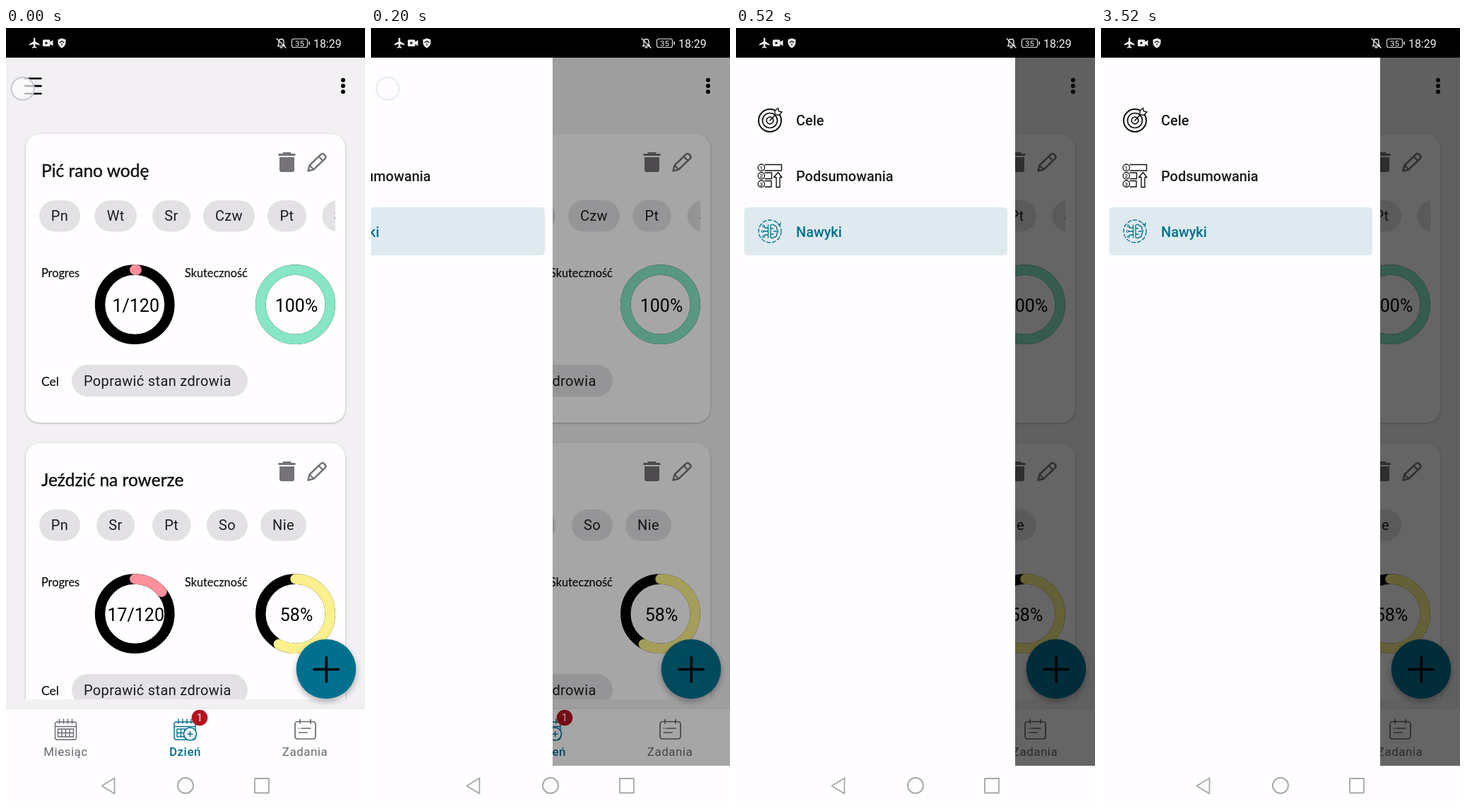
Write an HTML page that moves like this. It is 508 by 1102 pixels and loops after 8000 ms.

```html
<!DOCTYPE html>
<html lang="pl">
<head>
<meta charset="utf-8">
<title>Nawyki</title>
<style>
  html, body { margin: 0; width: 100%; height: 100%; overflow: hidden; background: #fffdff; }
  svg { display: block; width: 508px; height: 1102px; }
  text { font-family: Roboto, "Noto Sans", sans-serif; fill: #1b1b1e; }
  .mid { text-anchor: middle; }
  .title, .label { font-family: Lato, "Open Sans", sans-serif; fill: #111; stroke: #111; stroke-width: .4; }
  .title { font-size: 24.5px; }
  .label { font-size: 16.3px; stroke-width: .2; }
  .chip { font-size: 20px; letter-spacing: .35px; }
  .num { font-size: 25px; fill: #000; }
  .tab { font-size: 17px; letter-spacing: .5px; }
  .item { font-size: 19.9px; font-weight: 500; }
  .card { filter: drop-shadow(0 1px 1.5px rgba(0,0,0,.28)); }
  .fab { filter: drop-shadow(0 4px 4px rgba(0,0,0,.3)); }
  .line { fill: none; stroke-linecap: round; stroke-linejoin: round; }
</style>
</head>
<body>
<svg id="stage" viewBox="0 0 508 1102" xmlns="http://www.w3.org/2000/svg"></svg>
<script>
const LOOP = 8000, STEP = 40, WIDTH = 395;
const TEAL = '#00708e', GRAY = '#69676c';

const text = (x, y, s, cls, extra = '') => `<text x="${x}" y="${y}" class="${cls}" ${extra}>${s}</text>`;
const line = (d, color, w, extra = '') => `<path class="line" d="${d}" stroke="${color}" stroke-width="${w}" ${extra}/>`;
const rect = (x, y, w, h, r, fill, extra = '') => `<rect x="${x}" y="${y}" width="${w}" height="${h}" rx="${r}" fill="${fill}" ${extra}/>`;
const dot = (x, y, r, fill, extra = '') => `<circle cx="${x}" cy="${y}" r="${r}" fill="${fill}" ${extra}/>`;

const chip = ([x, w, s]) => rect(x, 244, w, 44.5, 22.2, '#e3e1e4') + text(x + w / 2, 273, s, 'chip mid');

function ring(x, share, color, label) {
  const c = `cx="${x}" cy="391.7" r="49.2" fill="none" stroke-width="14.4"`;
  return `<circle ${c} stroke="#000"/>
    <circle ${c} stroke="${color}" stroke-linecap="round" pathLength="100"
      stroke-dasharray="${share * 100} ${share < 1 ? 200 : 0}" transform="rotate(-90 ${x} 391.7)"/>` +
    text(x + 1.5, 401.5, label, 'num mid');
}

const trash = rect(385.5, 178, 24, 3, 0, '#757377') + rect(391.5, 176, 12, 3, 1, '#757377') +
  '<path d="M387 183H408V201Q408 204 405 204H390Q387 204 387 201Z" fill="#757377"/>';

const pencil = line('M427.5 202.5L429.5 194.5L445.5 179.2Q447.5 177 450 179L451.6 180.6Q453.6 183 451.4 185.2L435.3 200.5Z', '#757377', 2.5) +
  line('M442.5 182L448.5 188M430 195L435 200', '#757377', 2.2);

function card(dy, name, days, done, doneShare, rate, rateShare, rateColor) {
  return `<g transform="translate(0 ${dy})">` +
    rect(28, 150, 452, 409, 20, '#fffdff', 'class="card"') +
    text(50, 211, name, 'title') + trash + pencil +
    `<g clip-path="url(#row)">${days.map(chip).join('')}</g>` +
    text(50, 353, 'Progres', 'label') + ring(182.2, doneShare, '#ff909b', done) +
    text(253, 353, 'Skuteczność', 'label') + ring(409.5, rateShare, rateColor, rate) +
    text(50, 506.5, 'Cel', 'label', 'style="font-size:17.6px"') +
    rect(93, 477, 249, 45, 22.5, '#e3e1e4') + text(110, 506.5, 'Poprawić stan zdrowia', 'chip') + '</g>';
}

function calendar(x, color) {
  let d = `M${x + 3} 983H${x + 27}Q${x + 30} 983 ${x + 30} 986V1005Q${x + 30} 1008 ${x + 27} 1008H${x + 3}Q${x} 1008 ${x} 1005V986Q${x} 983 ${x + 3} 983M${x} 989.5H${x + 30}`;
  for (const y of [993, 998.5, 1004]) d += `M${x + 4} ${y}H${x + 26}`;
  for (const k of [4, 9.5, 15, 20.5, 26]) d += `M${x + k} 993V1004`;
  for (const k of [6, 12, 18, 24]) d += `M${x + k} 979V985`;
  return line(d, color, 1.4);
}

function tabs() {
  const plus = dot(260.5, 1000, 9, '#fffdff', `stroke="${TEAL}" stroke-width="1.6"`) +
    line('M257 1000H264M260.5 996.5V1003.5', TEAL, 1.5);
  const tasks = line('M413 982.5H434Q438 982.5 438 986.5V1003Q438 1007 434 1007H413Q409 1007 409 1003V986.5Q409 982.5 413 982.5M416 979.5V985M431 979.5V985M418 992H431M414.5 998H426M414.5 992H415', GRAY, 1.7);
  return rect(0, 963, 508, 2, 0, '#e6e4e7') + rect(0, 964.5, 508, 80.5, 0, '#fffdff') +
    calendar(69.5, GRAY) + calendar(238, TEAL) + plus + tasks +
    dot(274, 977, 11.3, '#b3121f') + text(274, 982, '1', 'mid', 'style="font-size:14px;fill:#fff"') +
    text(84.5, 1030.5, 'Miesiąc', 'tab mid', `style="fill:${GRAY}"`) +
    text(253.5, 1030.5, 'Dzień', 'tab mid', `style="fill:${TEAL};font-weight:500"`) +
    text(423, 1030.5, 'Zadania', 'tab mid', `style="fill:${GRAY}"`);
}

function statusBar() {
  const plane = '<path d="M39 14.5Q40.2 13 41.4 14.5V19L47.5 23V24.6L41.4 22.8V26L43.4 27.5V28.7L40.2 27.8L37 28.7V27.5L39 26V22.8L32.8 24.6V23L39 19Z" fill="#eee"/>';
  const camera = rect(52, 16.5, 10.5, 9.5, 1.5, '#eee') + '<path d="M62 20L66.5 17V25.5L62 22.5Z" fill="#eee"/>' + dot(57, 21.2, 1.6, '#000');
  const shield = '<path d="M79 14.5L84.5 16.5V21Q84 26 79 28.5Q74 26 73.5 21V16.5Z" fill="#eee"/>' + line('M76 20.5L79 18.5L82 20.5M79 22V24', '#000', 1.1);
  const bell = line('M384.5 25.5H394.5L393 23V19.5Q393 15.8 389.5 15.8Q386 15.8 386 19.5V23ZM388 27.8H391M383 15L396 28', '#e8e8e8', 1.4);
  const battery = rect(404.5, 15.5, 22, 12, 2.5, 'none', 'stroke="#ddd" stroke-width="1.2"') + rect(428.3, 19, 1.6, 5, .8, '#ddd') +
    text(415.5, 25.8, '35', 'mid', 'style="font-size:11.5px;fill:#eee"');
  return rect(0, 0, 508, 42, 0, '#000') + plane + camera + shield + bell + battery +
    text(435, 27.5, '18:29', '', 'style="font-size:15.9px;fill:#f2f2f2"');
}

function drawer() {
  const target = dot(48, 131, 16, 'none', 'stroke="#111" stroke-width="2"') +
    dot(48, 131, 10.5, 'none', 'stroke="#111" stroke-width="1.7"') +
    dot(48, 131, 4.8, 'none', 'stroke="#111" stroke-width="1.7"') +
    line('M48 131L58 120.5', '#111', 1.7) +
    '<path d="M55 122.5V117.5L59.5 113.5L60.5 118L65 119L60.5 123.5Z" fill="#fffdff" stroke="#111" stroke-width="1.4"/>';
  let list = line('M41 193.5H64.5V202H41M41 205H50.5V213.5H41M41 216.5H50V225H41', '#111', 1.4) +
    line('M57 225.5V211.5H53.5L59.5 204.5L65 211.5H62V225.5Z', '#111', 1.4);
  [197.7, 209.2, 220.7].forEach((y, i) => {
    list += dot(35.8, y, 4.7, '#fffdff', 'stroke="#111" stroke-width="1.3"') +
      text(35.8, y + 3, i + 1, 'mid', 'style="font-size:8px;font-weight:500"');
  });
  const brain = dot(48, 288, 16, 'none', `stroke="${TEAL}" stroke-width="1.3" stroke-dasharray="6 2"`) +
    line('M49 279.5Q52 276.5 54.5 280Q58.5 280.5 57.5 284.5Q61 288 57.5 291.5Q58 296 54 296.5Q51.5 299 49 296.5ZM49 284H52.5M57.5 288H53.5M49 292H53M59 277L62 280L63 276', TEAL, 1.3) +
    line('M45.5 279V297M45.5 283H41L39.5 281M45.5 288H39M45.5 293H41L39.5 295', TEAL, 1.3) +
    [[38.7, 280.5], [37.5, 288], [38.7, 295.8]].map(p => dot(...p, 1.5, 'none', `stroke="${TEAL}"`)).join('');
  return rect(0, 42, WIDTH, 1003, 0, '#fffdff') + rect(11.5, 254, 372.5, 68, 5, '#dfeaf0') +
    target + list + brain +
    text(85, 137.5, 'Cele', 'item') + text(85, 216.8, 'Podsumowania', 'item') +
    text(85, 296, 'Nawyki', 'item', `style="fill:${TEAL}"`);
}

const weekA = [[47, 58, 'Pn'], [125.5, 59.5, 'Wt'], [207, 54, 'Sr'], [279, 73, 'Czw'], [370, 55, 'Pt'], [447.5, 58, 'So']];
const weekB = [[47, 58, 'Pn'], [128, 54, 'Sr'], [207, 54.5, 'Pt'], [284, 58, 'So'], [360, 65, 'Nie']];

document.getElementById('stage').innerHTML = `
  <defs>
    <clipPath id="row"><rect x="40" y="240" width="426" height="55"/></clipPath>
    <clipPath id="list"><rect y="42" width="508" height="909"/></clipPath>
  </defs>` +
  rect(0, 0, 508, 1102, 0, '#fffdff') + rect(0, 42, 508, 1003, 0, '#f2f0f3') +
  line('M27 71.5H49.5M27 82.2H49.5M27 93H49.5', '#000', 2.7) +
  [73.8, 82, 90.2].map(y => dot(477, y, 3, '#000')).join('') +
  '<g clip-path="url(#list)">' +
  card(0, 'Pić rano wodę', weekA, '1/120', 1 / 120, '100%', 1, '#86e6c5') +
  card(438, 'Jeździć na rowerze', weekB, '17/120', 17 / 120, '58%', .58, '#fbf08b') + '</g>' +
  tabs() +
  dot(453, 908, 42.3, TEAL, 'class="fab"') + line('M436 908.5H470.5M453.3 891.5V926', '#000', 3.6) +
  rect(0, 42, 508, 1003, 0, '#000', 'id="scrim"') +
  `<g id="drawer">${drawer()}</g>` +
  line('M153.5 1062.5V1084.5L135.5 1073.5Z', '#a8a6a9', 1.8) +
  dot(254, 1073, 11, 'none', 'stroke="#a8a6a9" stroke-width="1.9"') +
  rect(352, 1063, 20, 20.5, .5, 'none', 'stroke="#a8a6a9" stroke-width="1.8"') +
  statusBar() +
  dot(23.7, 86, 16, '#fff', 'id="touch" fill-opacity=".7" stroke="#c6c8d6" stroke-width="2"');

// Settling progress: [ms, share of the glide], eased by a quintic curve
const glide = [[108, 0], [160, .107], [240, .272], [360, .467], [640, 1]];

function openness(t) {
  if (t <= glide[0][0]) return 0;
  const i = glide.findIndex(p => t < p[0]);
  if (i < 0) return 1;
  const [t0, a] = glide[i - 1], [t1, b] = glide[i];
  return 1 - (1 - a - (b - a) * (t - t0) / (t1 - t0)) ** 5;
}

const [scrim, panel, touch] = ['scrim', 'drawer', 'touch'].map(id => document.getElementById(id));

function draw() {
  const now = performance.now() % LOOP;
  const t = Math.floor(now / STEP) * STEP;
  panel.setAttribute('transform', `translate(${Math.round(WIDTH * openness(t)) - WIDTH} 0)`);
  scrim.setAttribute('opacity', .6 * openness(t - 16)); // shade trails by one screen refresh
  touch.setAttribute('opacity', Math.max(0, Math.min(1, 1 - (t - 80) / 200)));
  requestAnimationFrame(draw);
}
draw();
</script>
</body>
</html>
```
